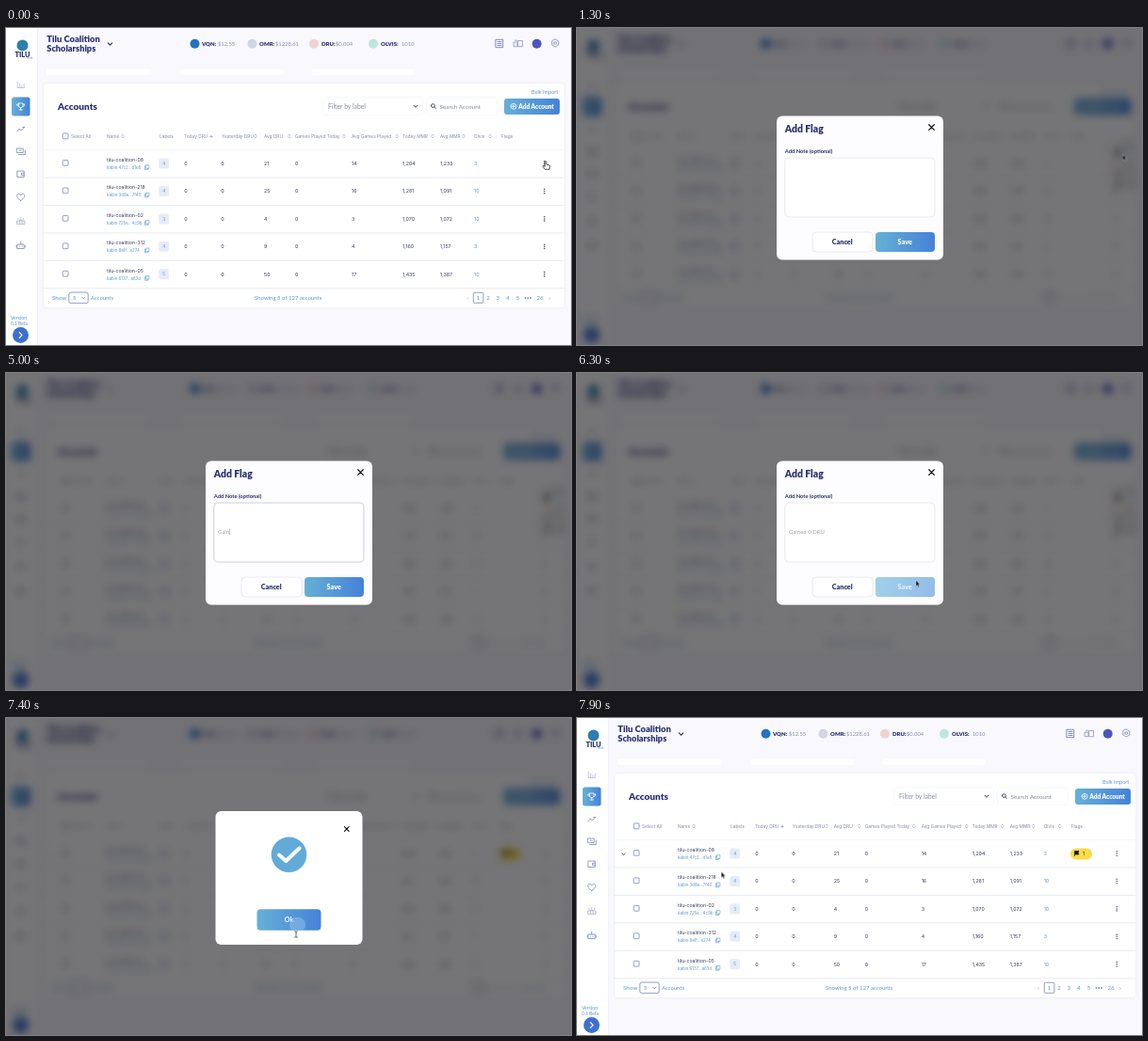
An HTML page for the animation above (8000 ms loop, 600 by 337 pixels).

```html
<!DOCTYPE html>
<html lang="en">
<head>
<meta charset="utf-8">
<title>Accounts: add flag</title>
<style>
  html, body { margin: 0; width: 100%; height: 100%; overflow: hidden; background: #f8f8fd; }
  svg { display: block; width: 600px; height: 337px; }
  text { white-space: pre; }
  .head { font-family: Lato, sans-serif; }
  .body { font-family: Inter, sans-serif; }
  .line { fill: none; stroke-linecap: round; stroke-linejoin: round; }
</style>
</head>
<body>
<svg id="stage" viewBox="0 0 600 337" xmlns="http://www.w3.org/2000/svg"></svg>
<script>
const LOOP = 8000, FRAME = 100;
const NAVY = '#29306f', INK = '#343a5e', GREY = '#858ba8', BLUE = '#5797cf', SLATE = '#7887b3';

// Markup helpers; text is placed by its vertical centre.
const text = (x, y, s, size, fill = INK, o = {}) =>
  `<text class="${o.font || 'head'}" x="${x}" y="${y}" dy=".35em" font-size="${size}" fill="${fill}"` +
  ` font-weight="${o.weight || 400}" text-anchor="${o.anchor || 'start'}"${o.id ? ` id="${o.id}"` : ''}>${s}</text>`;
const body = (x, y, s, size, fill, o = {}) => text(x, y, s, size, fill, { font: 'body', ...o });
const bold = (x, y, s, size, fill, o = {}) => text(x, y, s, size, fill, { weight: 900, ...o });
const rect = (x, y, w, h, fill, r = 0, extra = '') =>
  `<rect x="${x}" y="${y}" width="${w}" height="${h}" rx="${r}" fill="${fill}" ${extra}/>`;
const dot = (x, y, r, fill, extra = '') => `<circle cx="${x}" cy="${y}" r="${r}" fill="${fill}" ${extra}/>`;
const line = (d, color = SLATE, w = .8, extra = '') =>
  `<path class="line" d="${d}" stroke="${color}" stroke-width="${w}" ${extra}/>`;
const icon = (x, y, d, color, w) => line(d, color, w, `transform="translate(${x} ${y})"`);
const group = (id, inner, extra = '') => `<g id="${id}" ${extra}>${inner}</g>`;
const box = (x, y, w, h, color, r = 1) => rect(x, y, w, h, 'none', r, `stroke="${color}" stroke-width=".8"`);
const FLAG = 'M-2 3V-2.5H2.5L1.6 -.8L2.5 1H-2';
const CROSS = 'M-1 -1L1 1M1 -1L-1 1';

function sidebar() {
  const icons = [
    [60, 'M-3.5 3.5V-3M-1.2 3.5V-1M1.2 3.5V.5M3.5 3.5V-.5M-3.5 3.5H3.5', '#b6bed6'],
    [108, 'M-4 2L-1.5 -1L.5 1L4 -2.5M2 -2.5H4'],
    [131, 'M-4 -3H2.5V1.5H-4ZM-2.5 3.5H4.5V-1M-1.8 -.8H.4'],
    [155, 'M-3.5 -3H3.5V3.5H-3.5ZM3.5 -.8H.8V1.4H3.5'],
    [180, 'M0 3.5C-8 -1.5 -2.5 -6 0 -2C2.5 -6 8 -1.5 0 3.5Z'],
    [205, 'M-4.2 3V0H4.2V3ZM-1.4 3V-1H1.4V3M-2.8 -2.6V-1.6M0 -3.4V-2.4M2.8 -2.6V-1.6', '#a9b2cc'],
    [231, 'M-3.5 -1H3.5V3.5H-3.5ZM0 -1V-3.6M-4.6 .6V2M4.6 .6V2M-1.4 1V1.4M1.4 1V1.4']
  ];
  return rect(0, 0, 33, 337, '#fff', 0, 'filter="url(#soft)"') +
    dot(17.5, 18.5, 6, '#2c7fae') +
    bold(17.5, 28.3, 'TILU', 7.4, NAVY, { anchor: 'middle' }) +
    text(22.5, 32.4, 'beta', 3, BLUE) +
    rect(6, 73.5, 19.5, 20, 'url(#blue)', 2.5) +
    icon(15.7, 83.5, 'M-2.3 -3.5H2.3V-1C2.3 2 -2.3 2 -2.3 -1ZM-2.3 -2.5H-4C-4 -.5 -3 0 -2 0M2.3 -2.5H4C4 -.5 3 0 2 0M0 1.3V3.5M-1.8 3.5H1.8', '#fff') +
    icons.map(([y, d, c]) => icon(15.7, y, d, c || SLATE)).join('') +
    text(5, 308, 'Version', 5.2, BLUE) + text(5, 314.5, '0.1 Beta', 4.9, BLUE) +
    dot(15.5, 326.5, 8.5, '#3e70cf') + icon(15.5, 326.5, 'M-1.3 -2.8L1.5 0L-1.3 2.8', '#fff', 1.1);
}

function topBar() {
  const coins = [
    [200.5, '#2272c3', 208, 'VQN:', 225, '$12.55'],
    [261.5, '#d3d6e4', 269, 'OMR:', 286, '$1228.61'],
    [327, '#eed3d3', 335, 'DRU:', 350, '$0.004'],
    [390, '#bfe6de', 398, 'OLVIS:', 420, '1010']
  ];
  return bold(43.3, 11.5, 'Tilu Coalition', 9.4, NAVY) + bold(43.3, 21.5, 'Scholarships', 9.2, NAVY) +
    icon(110.5, 17, 'M-2.2 -1.2L0 1.2L2.2 -1.2', NAVY, 1.1) +
    coins.map(([cx, c, x, name, vx, v]) => dot(cx, 16.7, 5, c) +
      bold(x, 16.7, name, 6, NAVY) + text(vx, 16.7, v, 5.8, GREY)).join('') +
    icon(524, 16.5, 'M-3.7 -4.2H3.7V4.2H-3.7ZM-2 -2H2M-2 0H2M-2 2H2', '#6470a8') +
    icon(544, 16.5, 'M-4.5 -1.5H-1V3.2H-4.5ZM0 -3H4.5V3.2H0ZM-3.5 -3.3H-1.5', '#8a94bd') +
    dot(563.7, 16.7, 5, '#4d55bd') +
    icon(583.3, 16, 'M0 -4L3.5 -2V2L0 4L-3.5 2V-2ZM-1.4 0A1.4 1.4 0 1 0 1.4 0A1.4 1.4 0 1 0 -1.4 0', SLATE) +
    [[43, 111], [185, 109], [325, 109]].map(([x, w]) => rect(x, 43.5, w, 6.5, '#fff', 2)).join('');
}

function panelTop() {
  return rect(40, 59, 553, 238, '#fff', 4, 'filter="url(#soft)"') +
    bold(55, 83, 'Accounts', 10, NAVY) + text(558, 68, 'Bulk Import', 5.5, BLUE) +
    rect(337, 74.5, 105, 17.5, '#fff', 3, 'filter="url(#soft)"') +
    text(342, 83.3, 'Filter by label', 6.8, GREY) + icon(435, 83.3, 'M-2 -1L0 1L2 -1', INK, 1) +
    rect(447, 74.5, 74, 17.5, '#fff', 3, 'filter="url(#soft)"') +
    icon(453.5, 83, 'M-2 -.4A1.9 1.9 0 1 0 1.8 -.4A1.9 1.9 0 1 0 -2 -.4M1.3 1L2.7 2.5', INK, .9) +
    text(460.5, 83.3, 'Search Account', 6.4, GREY) +
    rect(529, 75, 59, 17, 'url(#blue)', 3) +
    icon(539, 83.3, 'M-3 0A3 3 0 1 0 3 0A3 3 0 1 0 -3 0M-1.5 0H1.5M0 -1.5V1.5', '#fff') +
    bold(544.2, 83.4, 'Add Account', 6.5, '#fff');
}

const ROWS = [
  ['08', '47c2...d1e8', 4, 21, 14, '1,204', '1,233', 3],
  ['218', '3d8a...7f40', 4, 25, 16, '1,281', '1,091', 10],
  ['02', '725e...4c9b', 3, 4, 3, '1,070', '1,072', 10],
  ['312', '8a1f...e274', 4, 9, 4, '1,160', '1,157', 3],
  ['05', '6137...a83d', 5, 50, 17, '1,435', '1,387', 10]
];
const rowY = i => 144 + i * 29.45;

function table() {
  const sorter = x => icon(x, 115, 'M-1 -.7L0 -1.8L1 -.7M-1 .7L0 1.8L1 .7', SLATE, .6);
  const head = ([x, s, sx]) => body(x, 115, s, 4.8, GREY) + (sx ? sorter(sx) : '');
  const fixed = [[107, 'Name', 124], [163, 'Labels'], [189, 'Today DRU'], [229, 'Yesterday DRU', 265]];
  const moving = [[274, 'Avg DRU', 301], [307, 'Games Played Today', 359], [367, 'Avg Games Played', 415],
    [421, 'Today MMR', 453], [461, 'Avg MMR', 486], [497, 'Olvis', 514], [526, 'Flags']];
  const check = y => box(60.2, y - 3, 5.8, 5.8, SLATE);
  const left = ([n, addr, label], i) => {
    const y = rowY(i);
    return check(y - .5) + body(107, y - 4, 'tilu-coalition-' + n, 5.2, INK) +
      body(107, y + 4.2, 'kabin:' + addr, 4.4, BLUE) +
      icon(149.7, y + 4, 'M-1 -2.3H2.2V1.3H-1ZM-1 -1H-2.3V2.5H1V1.3', BLUE, .6) +
      rect(162.3, y - 5.5, 10.7, 11, '#e5ecf8', 2) + body(167.7, y, label, 4.6, BLUE, { anchor: 'middle' }) +
      body(189.3, y, 0, 5.4) + body(228.3, y, 0, 5.4) +
      line(`M40 ${y + 15}H593`, '#e4e6ef', .8);
  };
  const right = ([, , , mean, games, today, avg, count], i) => {
    const y = rowY(i);
    return [[274, mean], [307, 0], [367, games], [421, today], [461, avg]]
      .map(([x, v]) => body(x, y, v, 5.3)).join('') + body(497, y, count, 5.3, BLUE);
  };
  const dots = (_, i) => [-2.2, 0, 2.2].map(d => dot(571.8, rowY(i) + d, .75, INK)).join('');
  return check(115) + body(69, 115, 'Select All', 4.8, GREY) +
    icon(218, 115, 'M-1 .5L0 -.7L1 .5Z', SLATE, .7) +
    fixed.map(head).join('') + line('M40 129.5H593', '#f0f1f7', .6) + ROWS.map(left).join('') +
    group('columns', moving.map(head).join('') + ROWS.map(right).join('')) +
    group('dots', ROWS.map(dots).join('')) +
    group('badge', icon(49.5, 144.7, 'M-1.6 -.8L0 .8L1.6 -.8', INK, .8) +
      rect(524, 138.5, 23, 12, '#f8dc4a', 6) +
      `<path d="${FLAG}" fill="#111" stroke="#111" stroke-width=".7" transform="translate(530.5 144)"/>` +
      body(537, 144.4, 1, 5.2, '#222'));
}

function footer() {
  const pages = [[490, '‹'], [501.5, 1], [512, 2], [522.3, 3], [533, 4], [543.5, 5], [567, 26], [577, '›']];
  return text(49, 286.7, 'Show', 6.3, BLUE) + box(66.8, 281, 20.4, 11.6, SLATE, 2) + text(71, 286.8, 5, 5.8, BLUE) +
    icon(82.3, 287, 'M-1.6 -.8L0 .8L1.6 -.8', SLATE, .8) + text(90, 286.7, 'Accounts', 5.9, BLUE) +
    text(264, 286.7, 'Showing 5 of 127 accounts', 6, BLUE) + box(496.3, 281.3, 10.6, 11, SLATE) +
    pages.map(([x, s]) => text(x, 286.8, s, 6, BLUE, { anchor: 'middle' })).join('') +
    [551.5, 554.3, 557.1].map(x => dot(x, 287, .9, BLUE)).join('');
}

function menu() {
  const items = [
    [124.5, 'Edit', 'M-2 2L-1.5 .3L1.5 -2.3L2.4 -1.3L-.4 1.6Z'],
    [133.5, 'Add Flag', FLAG, '#4a9ad4'],
    [144, 'Clear Flags', 'M-1.8 -1.8L1.8 1.8M1.8 -1.8L-1.8 1.8'],
    [154.5, 'Unassign', 'M-2.6 0A2.6 2.6 0 1 0 2.6 0A2.6 2.6 0 1 0 -2.6 0M-1.3 1.5C-1 .2 1 .2 1.3 1.5M0 -1.3V-.5'],
    [165, 'Delete', 'M-2.5 -1.8H2.5M-1.8 -1.8V2.4H1.8V-1.8M-.7 -2.7H.7M-.5 -.4V1.2M.5 -.4V1.2']
  ];
  return group('menu', rect(567, 117.5, 40, 53.5, '#fff', 2, 'filter="url(#drop)"') +
    items.map(([y, s, d, c], i) =>
      (i === 1 ? `<path d="${FLAG}" fill="#111" transform="translate(574.5 ${y})"/>` : '') +
      icon(574.7, y, d, ['#333', '#111', '#d9603f', '#333', '#333'][i], .8) + text(i ? 580.5 : 582, y, s, 5.6, c || '#333')).join(''),
    'clip-path="url(#menuClip)"');
}

function flagDialog() {
  return group('form', rect(212, 93.5, 177, 153, '#fdfdff', 6) +
    bold(220.7, 107.8, 'Add Flag', 10.4, NAVY) +
    line(CROSS, '#111', .45, 'transform="translate(376.5 105.6) scale(2.8)"') +
    text(220.7, 130.7, 'Add Note (optional)', 5.8, NAVY, { weight: 700 }) +
    rect(220.8, 138, 159.2, 63, '#fff', 4, 'stroke="#e3e4ee" stroke-width=".8"') +
    group('focus', box(220.8, 138, 159.2, 63, '#cfd2e2', 4)) +
    text(225, 168.8, 'Gained 0 DRU', 6, '#a3a4ad', { id: 'note' }) +
    group('caret', line('M225.4 166V172', '#8c8d99', .6)) +
    rect(250, 217, 64, 21, '#fff', 4, 'stroke="#e2e4ef" stroke-width=".8"') +
    bold(281.7, 227, 'Cancel', 7.3, NAVY, { anchor: 'middle' }) +
    rect(317, 217, 63, 21, 'url(#blue)', 4) + bold(348.3, 227, 'Save', 7.3, '#fff', { anchor: 'middle' }) +
    group('pressed', rect(317, 217, 63, 21, '#c9e4f5', 4, 'opacity=".6"')));
}

function doneDialog() {
  return group('done', rect(222.5, 99, 156, 142, '#fff', 6) +
    line(CROSS, '#111', .5, 'transform="translate(361.8 118) scale(2.3)"') +
    dot(300.5, 145.3, 18.8, '#62abd9') + line('M290 145.5L297.3 152L311.5 138.5', '#fff', 4) +
    rect(266.5, 203.3, 68, 22.5, 'url(#blue)', 4) + text(300.5, 214.2, 'Ok', 7.2, '#fff', { weight: 700, anchor: 'middle' }) +
    group('ripple', dot(309.5, 220, 8.5, '#8fc0ea', 'opacity=".55"'), 'clip-path="url(#okClip)"'));
}

function pointer() {
  return group('cursor',
    group('hand', `<path d="M-.8 .3C-.8 -.7 .8 -.7 .8 .3V3L4 3.8C4.7 4 4.8 4.6 4.6 5.4L4 8.3H-.6L-3 5.3C-3.4 4.5 -2.4 4 -1.7 4.6L-.8 5.3Z" fill="#fff" stroke="#222" stroke-width=".8"/>`) +
    group('arrow', '<path d="M0 0V6.2L1.4 5L2.4 7.2L3.4 6.7L2.4 4.6L4.3 4.4Z" fill="#111" stroke="#fff" stroke-width=".35"/>') +
    group('beam', line('M-1.3 -3.2C-.4 -3.2 0 -3 0 -2.4V2.4C0 3 .4 3.2 1.3 3.2M1.3 -3.2C.4 -3.2 0 -3 0 -2.4M0 2.4C0 3 -.4 3.2 -1.3 3.2', '#333', .75)));
}

const defs = `<defs>
  <linearGradient id="blue"><stop offset="0" stop-color="#66b0d6"/><stop offset="1" stop-color="#4582d8"/></linearGradient>
  <filter id="soft" x="-20%" y="-20%" width="140%" height="140%"><feDropShadow dx="0" dy="0" stdDeviation="1.2" flood-color="#8890c0" flood-opacity=".16"/></filter>
  <filter id="drop" x="-30%" y="-30%" width="160%" height="160%"><feDropShadow dx="0" dy="1" stdDeviation="2" flood-color="#444a70" flood-opacity=".3"/></filter>
  <clipPath id="menuClip"><rect x="560" y="110" width="34.5" height="70"/></clipPath>
  <clipPath id="okClip"><rect x="266.5" y="203.3" width="68" height="22.5" rx="4"/></clipPath>
</defs>`;

const $ = id => document.getElementById(id);
$('stage').innerHTML = defs +
  group('page', rect(0, 0, 600, 337, '#f8f8fd') + topBar() + sidebar() + panelTop() + table() + footer() + menu()) +
  group('shade', rect(0, 0, 600, 337, '#020004', 0, 'opacity=".545"')) +
  flagDialog() + doneDialog() + pointer();

// steps: [time, value, glide]; a glide travels to the next step at ten positions a second.
function play(el, prop, steps) {
  const frames = steps.map(([t, v, glide], i) => {
    const span = (steps[i + 1] || [LOOP])[0] - t;
    const count = glide ? Math.round(span / FRAME) : 1;
    return { offset: t / LOOP, [prop]: v, easing: `steps(${count}, end)` };
  });
  frames.push({ offset: 1, [prop]: steps.at(-1)[1] });
  el.animate(frames, { duration: LOOP, iterations: Infinity });
}
const show = (id, ...spans) =>
  play($(id), 'opacity', [...(spans[0][0] ? [[0, 0]] : []), ...spans.flatMap(([a, b]) => b < LOOP ? [[a, 1], [b, 0]] : [[a, 1]])]);
const at = (x, y) => `translate(${x}px, ${y}px)`;

show('menu', [300, 6700]);
show('shade', [1300, 7500]);
show('form', [1300, 6700]);
show('focus', [2900, 6000]);
show('pressed', [6200, 6700]);
show('done', [6700, 7500]);
show('ripple', [7300, 7500]);
show('badge', [6900, LOOP]);
show('hand', [0, 1300]);
show('arrow', [1300, 2800], [5800, 7100], [7500, LOOP]);
show('beam', [2800, 4300], [7100, 7500]);
play($('page'), 'filter', [[0, 'none'], [1300, 'blur(4px)'], [7500, 'none']]);
play($('columns'), 'transform', [[0, at(0, 0)], [6900, at(-1.3, 0)]]);
play($('dots'), 'transform', [[0, at(0, 0)], [6900, at(1.5, 0)]]);
play($('cursor'), 'transform', [
  [0, at(573, 142)], [300, at(573, 142), 1], [800, at(580.5, 135)],
  [1300, at(579.5, 134.5)], [1600, at(579.5, 134.5), 1], [1800, at(571, 141)],
  [2400, at(571, 141), 1], [2900, at(337.5, 184)], [5700, at(337.5, 184), 1],
  [6200, at(360, 220.5)], [6700, at(360, 220.5), 1], [7300, at(308, 230)],
  [7500, at(306, 228)], [7700, at(306, 228), 1], [7900, at(153.3, 163.5)]
]);

// Typing: [time, characters shown]
const typing = [[4300, 1], [4700, 2], [5000, 4], [5100, 6], [5200, 8], [5400, 10], [5500, 12]];
const note = $('note'), words = note.textContent;
const caretAt = n => at(n ? note.getSubStringLength(0, n) : 0, 0);
play($('caret'), 'transform', [[0, at(0, 0)], ...typing.map(([t, n]) => [t, caretAt(n)])]);
show('caret', [3200, 5800]);
let from = 0;
note.innerHTML = typing.map(([, n]) => {
  const part = `<tspan>${words.slice(from, n)}</tspan>`;
  from = n;
  return part;
}).join('');
[...note.children].forEach((part, i) => play(part, 'fillOpacity', [[0, 0], [typing[i][0], 1]]));
</script>
</body>
</html>
```
